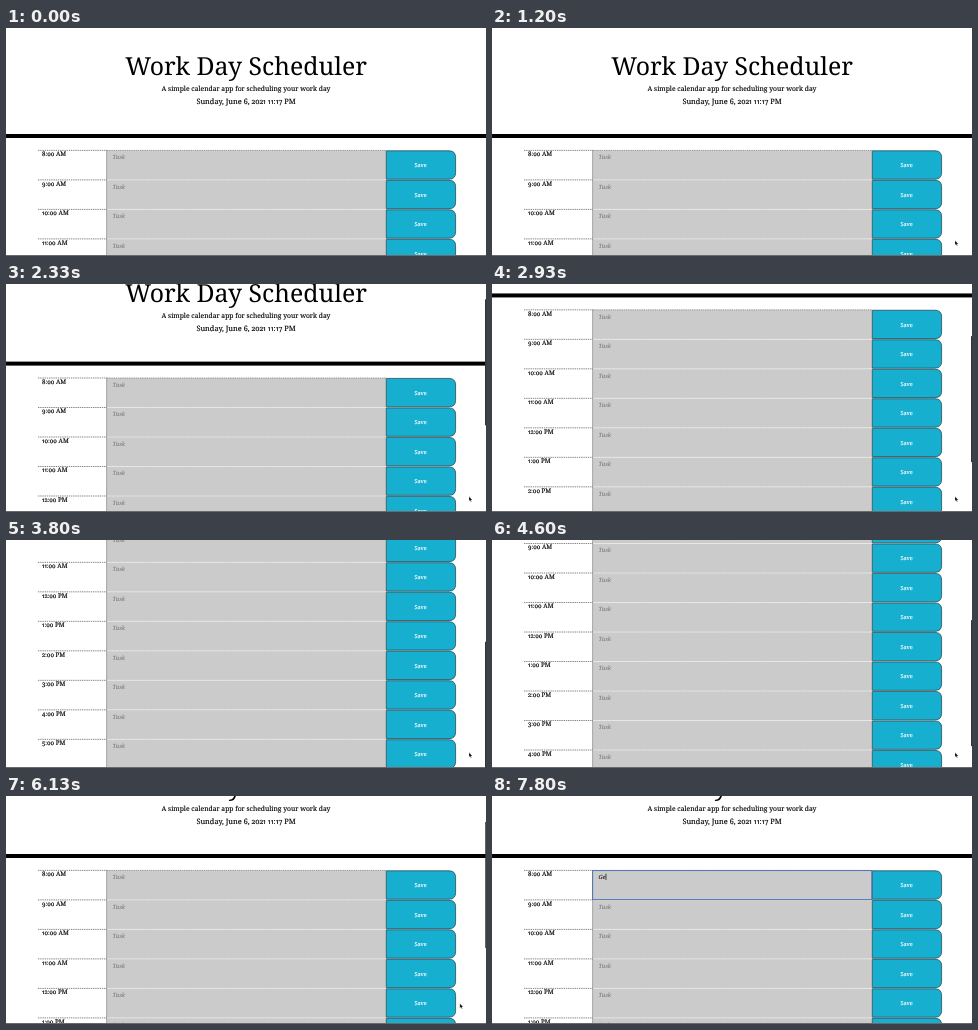
An HTML page that plays this animation: 480 px wide and 228 px high, repeating every 8 s.

```html
<!DOCTYPE html>
<html lang="en">
<head>
<meta charset="utf-8">
<title>Work Day Scheduler</title>
<style>
html, body { margin: 0; width: 100%; height: 100%; overflow: hidden; background: #fff; }
svg { display: block; width: 100vw; height: 100vh; }
text { font-family: "Noto Serif", serif; font-variant-numeric: oldstyle-nums proportional-nums; text-rendering: geometricPrecision; }
.mid { text-anchor: middle; }
.title { font-size: 24.8px; }
.lead { font-size: 6.75px; stroke: #000; stroke-width: .12; }
.date { font-size: 7.4px; }
.hour { font-size: 6.2px; stroke: #000; stroke-width: .15; }
.task { font-size: 5.8px; font-style: italic; fill: #707070; }
.save { font-size: 5.6px; fill: #fff; stroke: #fff; stroke-width: .15; }
</style>
</head>
<body>
<svg id="stage" viewBox="0 0 480 228">
  <g id="page">
    <text class="mid title" x="240" y="46.6">Work Day Scheduler</text>
    <text class="mid lead" x="240" y="62.5">A simple calendar app for scheduling your work day</text>
    <text class="mid lead date" x="240" y="75.9">Sunday, June 6, 2021 11:17 PM</text>
    <rect y="106" width="480" height="4"/>
    <g id="rows"></g>
    <rect id="focus" x="100.6" y="122.6" width="279.2" height="29" fill="none" stroke="#4470b8" stroke-width=".9"/>
    <rect id="caret" y="125.6" width=".7" height="6.4"/>
  </g>
  <rect y="227" width="480" height="1" fill="#6a6a6a"/>
  <rect id="bar" x="479" width="1" height="126" fill="#333"/>
  <path id="arrow" d="M0 0V4.6L1.1 3.7L1.9 5.3L2.7 4.9L1.9 3.4H3.3Z" stroke="#fff" stroke-width=".3"/>
  <path id="beam" d="M-1.2-3.6Q0-3.6 0-2.8Q0-3.6 1.2-3.6M0-2.8V2.8M-1.2 3.6Q0 3.6 0 2.8Q0 3.6 1.2 3.6" fill="none" stroke="#222" stroke-width=".6"/>
</svg>
<script>
const LOOP = 8000, TOP = 122.4, PITCH = 29.5;
const SVG = "http://www.w3.org/2000/svg";
const $ = id => document.getElementById(id);
const rows = $("rows");

const SWIPES = [
  { from: 1400, to: 2030, by: 26 },
  { from: 2230, to: 3324, by: 100 },
  { from: 3430, to: 3820, by: 63 },
  { from: 4163, to: 5270, by: -117.5 },
  { from: 5430, to: 5800, by: -23.5 }
];

function add(tag, attrs, label) {
  const el = document.createElementNS(SVG, tag);
  for (const key in attrs) el.setAttribute(key, attrs[key]);
  if (label) el.textContent = label;
  rows.append(el);
  return el;
}

function line(x1, y1, x2, y2, stroke, dash = "none") {
  add("path", { d: `M${x1} ${y1}L${x2} ${y2}`, stroke, "stroke-dasharray": dash, "stroke-width": .7 });
}

function addRow(i) {
  const y = TOP + i * PITCH, h = 8 + i;
  add("rect", { x: 101, y, width: 279, height: PITCH, fill: "#cbcbcb" });
  line(32, y, 101, y, "#555", "1.4 .8");
  line(101, y, 380, y, i ? "#f2f2f2" : "#777", i ? "2 .5" : "1.4 .8");
  line(100.6, y, 100.6, y + PITCH, "#808080");
  add("path", {
    d: `M380.3 ${y + .4}H443q6.6 0 6.6 6.6v15.2q0 6.6-6.6 6.6H380.3Z`,
    fill: "#17afd0", stroke: "#23434c", "stroke-width": .75
  });
  add("text", { class: "hour", x: 36, y: y + 5.7 }, `${(h - 1) % 12 + 1}:00 ${h < 12 ? "AM" : "PM"}`);
  add("text", { class: "save mid", x: 414.6, y: y + 16.9 }, "Save");
  return add("text", { class: "task", x: 106.4, y: y + 8.7 }, "Task");
}

const entry = Array.from({ length: 10 }, (_, i) => addRow(i))[0];

const clamp = v => Math.max(0, Math.min(1, v));
const show = (el, on) => el.setAttribute("visibility", on ? "visible" : "hidden");
const mix = (a, b, k) => a + (b - a) * k;

function ease(t, from, to) {
  const k = clamp((t - from) / (to - from));
  return k * k * (3 - 2 * k);
}

function draw(t) {
  const scroll = SWIPES.reduce((sum, s) => sum + s.by * ease(t, s.from, s.to), 0);
  $("page").setAttribute("transform", `translate(0 ${-scroll})`);
  $("bar").setAttribute("y", scroll * .54);
  $("bar").setAttribute("opacity", t < 1470 ? 0 : clamp((6330 - t) / 260));

  const typed = t < 7600 ? "" : t < 7800 ? "G" : "Ge";
  entry.textContent = typed || "Task";
  entry.style.fill = typed ? "#000" : "";
  show($("focus"), t >= 6830);
  show($("caret"), t >= 6830 && (t < 7330 || typed));
  $("caret").setAttribute("x", typed ? 106.6 + entry.getComputedTextLength() : 106.4);

  // the pointer slides in from below, rests, then goes to the first field
  const enter = ease(t, 400, 1200), leave = ease(t, 6030, 6870);
  const x = mix(mix(388, 463, enter), 233.5, leave);
  const y = mix(mix(229, 212.5, enter), 87.5, leave);
  const overField = x < 380;
  for (const id of ["arrow", "beam"]) $(id).setAttribute("transform", `translate(${x} ${y})`);
  show($("arrow"), t >= 430 && !overField);
  show($("beam"), overField && !typed);
}

function tick() {
  draw(performance.now() % LOOP);
  requestAnimationFrame(tick);
}
tick();
</script>
</body>
</html>
```
